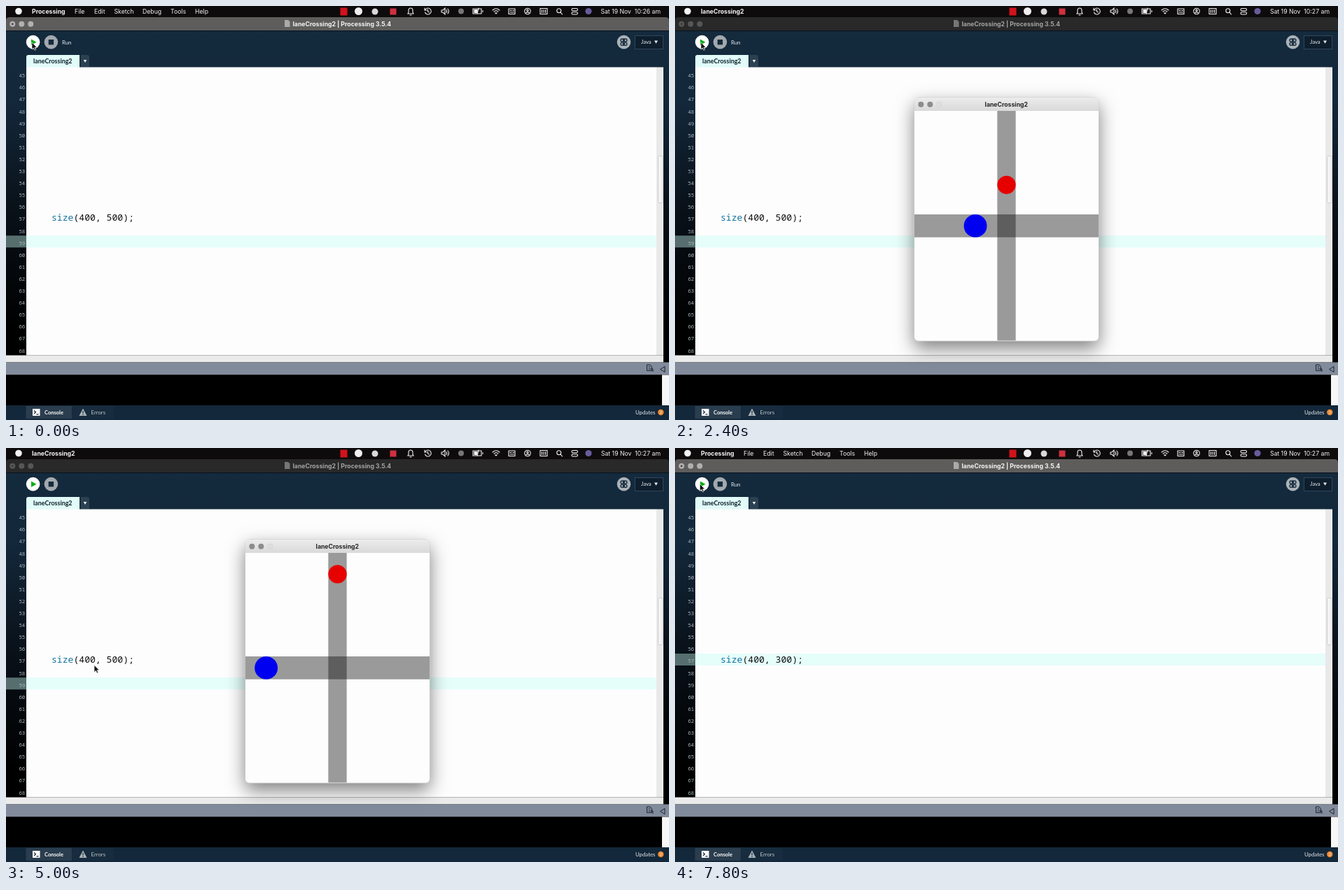
Write an HTML page that moves like this. It is 947 px wide and 592 px high and loops after 8 s.

```html
<!DOCTYPE html>
<html lang="en">
<head>
<meta charset="utf-8">
<title>Sketch editor</title>
<style>
  html, body { margin: 0; width: 100%; height: 100%; overflow: hidden; background: #000; }
  svg { display: block; }
  text { white-space: pre; }
  .ui { font: 8.7px Inter, sans-serif; fill: #f4f4f4; }
  .bold { font-weight: 650; }
  .tool { font: 7.8px Lato, sans-serif; fill: #e6ebee; }
  .code { font: 13.1px "Noto Sans Mono", monospace; fill: #111; }
  .num { font: 7.4px "Noto Sans Mono", monospace; fill: #a9b5bd; text-anchor: end; }
  .line { fill: none; stroke: #f0f0f0; stroke-width: 1.1; stroke-linecap: round; }
</style>
</head>
<body>
<svg width="947" height="592" viewBox="0 0 947 592">
  <defs>
    <linearGradient id="frameFill" gradientUnits="userSpaceOnUse" x1="0" y1="35" x2="0" y2="460">
      <stop offset="0" stop-color="#142a3d"/>
      <stop offset=".25" stop-color="#13273a"/>
      <stop offset=".6" stop-color="#091119"/>
      <stop offset="1" stop-color="#000"/>
    </linearGradient>
    <linearGradient id="windowBar" x2="0" y2="1">
      <stop stop-color="#ececec"/>
      <stop offset="1" stop-color="#d9d9d9"/>
    </linearGradient>
    <filter id="shadow" x="-30%" y="-30%" width="160%" height="160%">
      <feDropShadow dx="0" dy="10" stdDeviation="13" flood-opacity=".5"/>
    </filter>
    <clipPath id="canvasClip"><path d="M0 0H400V490Q400 500 390 500H10Q0 500 0 490Z"/></clipPath>
  </defs>

  <!-- Menu bar -->
  <rect width="947" height="592" fill="#0e0b0c"/>
  <circle cx="18" cy="7.5" r="4.8" fill="#f4f4f4"/>
  <text id="appName" class="ui bold" x="37" y="10.8"></text>
  <g id="menus" class="ui"></g>
  <text id="clock" class="ui" x="935" y="10.8" text-anchor="end"></text>
  <rect x="477.500" y="2.500" width="10" height="11" fill="#d3121b"/>
  <circle cx="503.500" cy="7.500" r="5.500" fill="#f0f0f0"/>
  <circle cx="527" cy="8" r="4.500" fill="#d9d9d9"/>
  <rect x="548.500" y="3.500" width="9" height="9" fill="#cf3040"/>
  <circle cx="650" cy="7.500" r="4" fill="#777"/>
  <circle cx="832" cy="7.500" r="4.600" fill="#665d9d"/>
  <g class="line">
    <path d="M574 11H582L581 9V6Q581 3 578 3T575 6V9ZM577 13H579"/>
    <path d="M599 5A4.500 4.500 0 1 1 598.500 9M598 3V6H601M602.500 5V8L604.500 9"/>
    <path d="M622 6V9H624L627 12V3L624 6ZM629 5.500Q630.500 7.500 629 9.500M631 4Q634 7.500 631 11"/>
    <path d="M667 4H679V11H667ZM681 6.500V8.500"/>
    <path d="M669 5.500H673V9.500H669Z" fill="#f0f0f0"/>
    <path d="M673 11L675 3M695 6Q700 1.500 705 6M697 8Q700 5.500 703 8M699 10L700 11 701 10Z"/>
    <path d="M718 4H727V11.500H718ZM720 6.500H722M724 6.500H725.500M720 9H725.500"/>
    <circle cx="745" cy="7.500" r="4.300"/><circle cx="745" cy="6.300" r="1.200"/><path d="M742.500 10Q745 7.800 747.500 10"/>
    <path d="M763 3.500H773V11.500H763ZM765.500 5.500V9.500M768 5.500V9.500M770.500 5.500V9.500"/>
    <circle cx="789.800" cy="6.800" r="3"/><path d="M792 9L794.500 11.800"/>
    <rect x="808" y="3.500" width="8.500" height="3.300" rx="1.600"/><rect x="808" y="8.700" width="8.500" height="3.300" rx="1.600"/>
  </g>

  <!-- Editor window -->
  <path id="titleBar" d="M0 36V21Q0 16 5 16H942Q947 16 947 21V36Z"/>
  <g id="titleButtons"><circle cx="9.300" cy="25.700" r="4"/><circle cx="22.300" cy="25.700" r="4"/><circle cx="35.300" cy="25.700" r="4"/></g>
  <circle cx="9.300" cy="25.700" r="1.300" fill="#333"/>
  <g id="title">
    <path d="M398 20H403L405.500 22.500V30H398Z" fill="#aaa"/>
    <text class="ui bold" x="409.500" y="28.500">laneCrossing2 | Processing 3.5.4</text>
  </g>
  <rect y="35" width="947" height="475" fill="url(#frameFill)"/>
  <path d="M0 35.500H947" stroke="#08121b"/>

  <circle cx="38.600" cy="51.600" r="9.800" fill="#fff"/>
  <path d="M36 47.500L43.500 51.700 36 56Z" fill="#0cae18"/>
  <circle cx="64.400" cy="51.600" r="9.800" fill="#a2a9ae"/>
  <rect x="60.700" y="48" width="7.400" height="7.400" fill="#152a3c"/>
  <text id="runLabel" class="tool" x="80" y="54.500">Run</text>
  <circle cx="882.500" cy="51.600" r="9.800" fill="#aab3b9"/>
  <g fill="none" stroke="#13273a" stroke-width="1.300">
    <circle cx="880" cy="49" r="2"/><circle cx="885" cy="49" r="2"/>
    <circle cx="880" cy="54.300" r="2"/><circle cx="885" cy="54.300" r="2"/><path d="M882.500 46V57"/>
  </g>
  <rect x="898.500" y="42.500" width="40" height="19" fill="#0e1e2d" stroke="#30465a"/>
  <text class="tool" x="907" y="54.300">Java</text>
  <path d="M926 49.500H931L928.500 53.800Z" fill="#e6ebee"/>

  <path d="M29 88V73Q29 70 32 70H105V88Z" fill="#e1fcf8"/>
  <text class="tool" x="39" y="81.500" style="font-size:8.900px;font-weight:700;fill:#0b1d2b">laneCrossing2</text>
  <path d="M106.500 87V70H116Q119 70 119 73V87Z" fill="#2b4051"/>
  <path d="M110.700 77H115.300L113 81Z" fill="#f0f0f0"/>

  <rect x="29" y="87.500" width="900" height="412" fill="#fdfdfd"/>
  <rect x="929" y="87.500" width="10" height="412" fill="#e9e9e9"/>
  <rect x="931.500" y="214.500" width="6.500" height="67" rx="1" fill="#f3f3f3" stroke="#cfcfcf"/>
  <g id="activeLine">
    <rect width="29" height="17" fill="#566f6e"/>
    <rect x="29" width="900" height="17" fill="#e5fefa"/>
  </g>
  <g id="lineNumbers"></g>
  <text class="code" x="65" y="307.300"><tspan fill="#16729e">size</tspan>(400, <tspan id="height"></tspan>);</text>
  <rect id="caret" width="1" height="16" fill="#444"/>

  <rect y="499.500" width="939" height="10" fill="#ebebeb"/>
  <rect y="509.500" width="947" height="18" fill="#818b9b"/>
  <path d="M915.500 513H920L922.500 515.500V521.500H915.500ZM917.500 516H920.500M917.500 519H924V523" fill="none" stroke="#1b2530"/>
  <path d="M941 515.500V523.500L934.500 519.500Z" fill="none" stroke="#1b2530"/>
  <rect y="527.500" width="947" height="44" fill="#000"/>
  <rect x="937" y="527.500" width="10" height="44" fill="#f7f7f7"/>
  <rect y="571" width="947" height="21" fill="#13283a"/>
  <rect x="28.500" y="572" width="65.500" height="18" fill="#2a3d4e"/>
  <rect x="95" y="572" width="59" height="18" fill="#172c3e"/>
  <rect x="38" y="576" width="10.500" height="10" fill="#fff"/>
  <path d="M40 578.500L42.500 580.700 40 583M43.500 583.800H46.500" fill="none" stroke="#13283a" stroke-width="1.200"/>
  <text class="tool" x="55" y="583.700" style="font-size:7.500px;font-weight:700;fill:#fff">Console</text>
  <path d="M110 575.500L115.500 586H104.500Z" fill="#aab3b9"/>
  <path d="M110 579V582.500M110 583.500V585" stroke="#13283a" stroke-width="1.200"/>
  <text class="tool" x="121.500" y="583.700" fill-opacity=".8">Errors</text>
  <text class="tool" x="899" y="583.700">Updates</text>
  <circle cx="935.300" cy="581" r="4.200" fill="#f08a32"/>
  <text class="tool" x="935.300" y="583.400" text-anchor="middle" style="font-size:6.500px">2</text>

  <!-- Running sketch -->
  <g id="sketch">
    <rect x="342" y="131" width="263" height="348" rx="6" fill="#fff" stroke="#aaa" stroke-width=".6" filter="url(#shadow)"/>
    <path d="M342 150V137Q342 131 348 131H599Q605 131 605 137V150Z" fill="url(#windowBar)"/>
    <g fill="#8c8c8c"><circle cx="351.300" cy="140.800" r="4"/><circle cx="364.300" cy="140.800" r="4"/></g>
    <circle cx="377.300" cy="140.800" r="3.800" fill="#dedede" stroke="#cfcfcf" stroke-width=".6"/>
    <text class="ui bold" x="473.300" y="143.700" text-anchor="middle" style="fill:#262626">laneCrossing2</text>
    <g transform="translate(342 150) scale(.6575)">
      <g clip-path="url(#canvasClip)">
        <path d="M0 0H400V500H0Z" fill="#fdfdfd"/>
        <path d="M180 0H220V500H180Z" fill-opacity=".392"/>
        <path d="M0 225H400V275H0Z" fill-opacity=".392"/>
        <circle id="redBall" cx="200" r="20" fill="#e60000"/>
        <circle id="blueBall" cy="250" r="25" fill="#0000f0"/>
      </g>
    </g>
  </g>

  <path id="pointer" d="M0 0V10L2.400 7.900 4 11.400 5.700 10.600 4.100 7.200H7.200Z" fill="#111" stroke="#eee" stroke-width=".7"/>
</svg>
<script>
  const LOOP = 8000, OPEN = 1800, CLOSE = 5400, CLICK = 5800;
  const CHAR = 7.86, CODE_X = 65;
  const $ = id => document.getElementById(id);
  const show = (id, on) => $(id).setAttribute("visibility", on ? "visible" : "hidden");
  const move = (id, x, y) => $(id).setAttribute("transform", `translate(${x} ${y})`);
  const addText = (parent, x, y, content, cls) => {
    const el = document.createElementNS(parent.namespaceURI, "text");
    el.setAttribute("x", x);
    el.setAttribute("y", y);
    if (cls) el.setAttribute("class", cls);
    el.textContent = content;
    parent.append(el);
  };

  [["File", 98], ["Edit", 126], ["Sketch", 154.5], ["Debug", 195], ["Tools", 235], ["Help", 270]]
    .forEach(([name, x]) => addText($("menus"), x, 10.8, name));
  for (let n = 45; n <= 68; n++) addText($("lineNumbers"), 27.3, 102.2 + (n - 45) * 17.1, n, "num");

  // Pointer stops: time, x, y
  const stops = [[0, 37, 52], [2500, 37, 52], [3200, 135.5, 331.5], [4200, 135.5, 331.5], [4900, 126, 310.5],
    [5100, 126, 310.5], [5700, 156, 296.5], [7100, 156, 296.5], [7600, 35.5, 51.5], [LOOP, 35.5, 51.5]];
  // Edits: time, caret column, height argument
  const edits = [[CLICK, 12, "500"], [6300, 11, "500"], [6600, 10, "00"], [7000, 11, "300"]];

  function pointerAt(t) {
    const i = stops.findIndex(s => s[0] > t);
    const [t0, x0, y0] = stops[i - 1], [t1, x1, y1] = stops[i];
    const u = (t - t0) / (t1 - t0), k = u * u * (3 - 2 * u);
    return [x0 + (x1 - x0) * k, y0 + (y1 - y0) * k];
  }

  function draw(t) {
    const running = t >= OPEN && t < CLOSE;
    $("appName").textContent = running ? "laneCrossing2" : "Processing";
    $("clock").textContent = `Sat 19 Nov  10:${t < OPEN ? 26 : 27} am`;
    show("menus", !running);
    show("sketch", running);
    $("titleBar").setAttribute("fill", running ? "#292929" : "#5e5d5c");
    $("titleButtons").setAttribute("fill", running ? "#565656" : "#b0b0b0");
    $("title").setAttribute("opacity", running ? .6 : 1);

    const run = ((t - 1740 + 2970) % 2970 - 100) / 1000;
    $("redBall").setAttribute("cy", -13 + 310 * run);
    $("blueBall").setAttribute("cx", 236 * run);

    const [since, column, height] = edits.findLast(e => t >= e[0]) || [550, 0, "500"];
    const editing = t >= CLICK;
    const lineY = editing ? 294 : 328.3;
    const blinkOn = (t - since + 1100) % 1100 < 550;
    $("height").textContent = height;
    move("activeLine", 0, lineY);
    move("caret", editing ? CODE_X + column * CHAR - .5 : 32.5, lineY + .5);
    show("caret", blinkOn && !running);

    const [x, y] = pointerAt(t);
    move("pointer", x, y);
    show("runLabel", Math.hypot(x - 38.6, y - 51.6) < 10);
  }

  const start = performance.now();
  function tick() {
    draw((performance.now() - start) % LOOP);
    requestAnimationFrame(tick);
  }
  tick();
</script>
</body>
</html>
```
